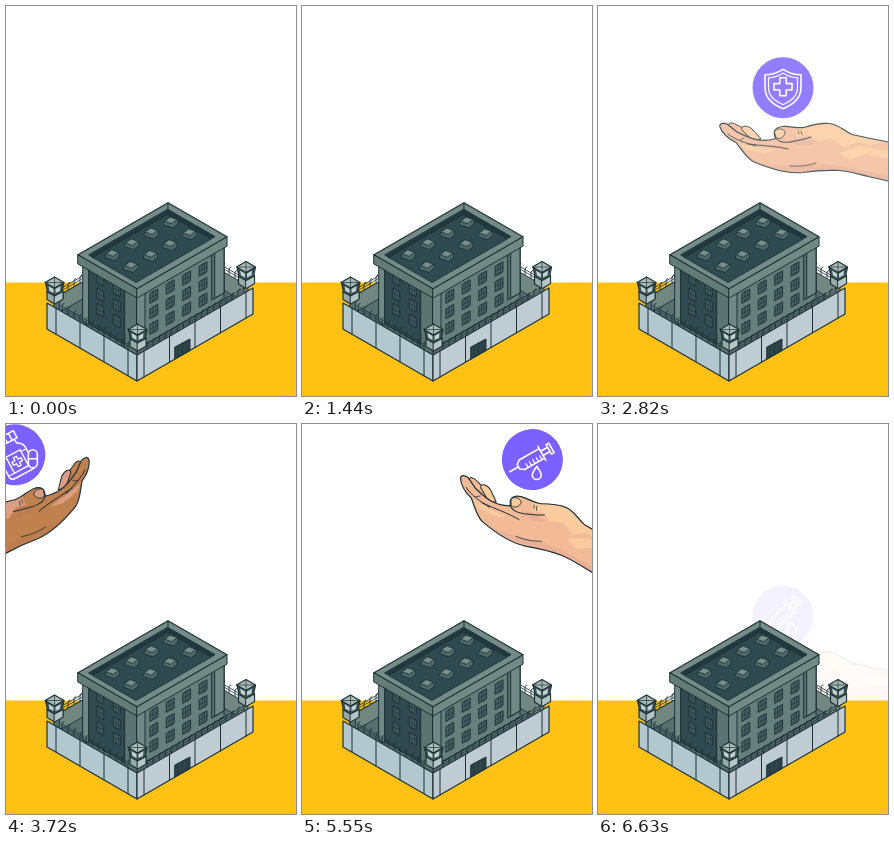
An HTML page that plays this animation: 290x390 px, repeating every 7.11 s.

```html
<!DOCTYPE html>
<html lang="en">
<head>
<meta charset="utf-8">
<title>Care over the walls</title>
<style>
html, body { margin: 0; width: 100%; height: 100%; overflow: hidden; background: #fff; }
svg { display: block; width: 290px; height: 390px; }
</style>
</head>
<body>
<svg id="stage" viewBox="0 0 290 390" stroke-linejoin="round" stroke-linecap="round"></svg>
<script>
const LOOP = 7110, TICK = 30, INK = '#1d3137';
const ISO = 0.577; // slope of every isometric edge
const stage = document.getElementById('stage');

const path = (d, fill = 'none', stroke = INK, width = 1) =>
  `<path d="${d}" fill="${fill}" stroke="${stroke}" stroke-width="${width}"/>`;
const poly = (points, fill, width = 1) => path(`M${points}Z`, fill, INK, width);
const line = (d, width = 1) => path(d, 'none', INK, width);
const range = (n, fn) => Array.from({ length: n }, (_, i) => fn(i)).join('');
const at = (x, y, angle, body) => `<g transform="translate(${x} ${y}) rotate(${angle})">${body}</g>`;

/* ---------- hands and icons ---------- */

const HAND = 'M420 180L290 148L270 143.5C260 141 250 138 241 137.5C228 137 212 138.5 205 139.5C188 141 170 135 156 129C149 126 144 117 138 109.5C131 106 124 100 122 94C121 90 125 90 129 91L139 99C147 103 153 106 160 107C167 108 173 107 178 105.5C174 99 177 94 185 93.5C192 93 198 95.5 206 94.5C214 92 222 89.5 231 90.5C240 91 246 98 254 101.5L270 105L290 109L420 140';

function hand({ base, light, shade }) {
  return path('M131 94C129 89 134 89 139 92L151 98L162 107L150 111Z', base) +
    path('M144 97C142 92 149 92 154 96L163 106L156 108Z', light) +
    path(HAND, base, 'none') +
    path('M198 95C212 94 222 90 232 91C242 92 248 100 262 104L290 109L272 112L258 109L246 115L234 106L220 108L209 102L199 104Z', light, 'none') +
    path('M242 120L262 113L290 118V126L268 121L252 127Z', light, 'none') +
    path('M139 110C150 114 164 115 178 117L166 120L148 117Z', light, 'none') +
    path('M160 130C178 135 196 132 220 131C240 131 256 136 290 143V148C266 142 250 138 238 137.5C220 137 190 142 160 130Z', shade, 'none') +
    path('M190 108C198 105 208 106 216 110C210 114 198 113 190 108Z', shade, 'none') +
    line(HAND, 1.2) +
    line('M177 104C179 109 186 110 193 109C200 107 206 107 213 104') +
    line('M130 101C137 107 148 110 158 113M150 111C165 113 178 113 190 116', .9) +
    line('M192 133C204 134 212 132 218 130M203 98L204 102M200 97.5L201 101M142 107L146 105', .7) +
    path('M176.5 99C178 95 184 95 187 98.5C187 104 182 107 178.5 105Z', light, INK, .8);
}

const white = (d, width = 1.6) => path(d, 'none', '#fff', width);
const cross = (s, a) =>
  `M${-a} ${-s}h${2 * a}v${s - a}h${s - a}v${2 * a}h${a - s}v${s - a}h${-2 * a}v${a - s}h${a - s}v${-2 * a}h${s - a}Z`;
const capsule = (l, r) =>
  `<rect x="${-l}" y="${-r}" width="${2 * l}" height="${2 * r}" rx="${r}" fill="#7b61ff" stroke="#fff" stroke-width="1.6"/>` +
  white(`M0 ${-r}V${r}`);

const icons = {
  pills: at(-5.5, 0, -13,
      '<rect x="-11" y="-19" width="22" height="38" rx="2.5" fill="none" stroke="#fff" stroke-width="1.6"/>' +
      range(8, i => `<circle cx="${i % 2 ? 5 : -5}" cy="${(i >> 1) * 8.8 - 13.2}" r="3" fill="none" stroke="#fff" stroke-width="1.4"/>`)) +
    at(12, 11, -41, capsule(11, 5.5)),
  shield:
    white('M0-18.5C6-14.5 12-13 18-13V0C18 10 10 17 0 21C-10 17-18 10-18 0V-13C-12-13-6-14.5 0-18.5Z') +
    white('M0-14.5C5-11.5 10-10 14.5-10V0C14.5 8 8 13.5 0 17C-8 13.5-14.5 8-14.5 0V-10C-10-10-5-11.5 0-14.5Z', 1.2) +
    at(0, -1, 0, white(cross(9, 3.2))),
  bottle:
    white('M-11-22H10V-14H-11ZM-6-22V-14M-1-22V-14M4.5-22V-14M-8-14V-10C-12-8-15.5-6-15.5-1V17Q-15.5 21-11 21H9Q13 21 13 17V-1C13-6 10-8 7-10V-14', 1.5) +
    white('M-15 0H-9M7 0H13M-15 16H-9', 1.1) +
    white('M-9-2H7V16H-9Z', 1.4) + at(-1, 7, 0, white(cross(5, 1.7), 1.3)) +
    at(14, 12, -62, capsule(9, 4.5)),
  syringe: at(-1, 0, -47,
      white('M-25 0H-15M-15-2.5L-11-5.5H12V5.5H-11L-15 2.5ZM12-8V8M12-2.5H20M12 2.5H20M20-5.5H23V5.5H20Z') +
      white('M-7 5V1M-3 5V1M1 5V1M5 5V1M9 5V1', 1.2)) +
    at(8, 11, -17, white('M0-6C3-2 4.5 0 4.5 2.5A4.5 4.5 0 0 1-4.5 2.5C-4.5 0-3-2 0-6Z'))
};

const skins = {
  tan: { base: '#c0814f', light: '#db9d84', shade: '#bd7d50' },
  fair: { base: '#f3ba98', light: '#fbcb9d', shade: '#eab094' }
};

const acts = [
  { side: -1, skin: 'tan', icon: 'pills', enter: 90, leave: 1050, clear: 1440 },
  { side: 1, skin: 'fair', icon: 'shield', enter: 1860, leave: 2820, clear: 3630 },
  { side: -1, skin: 'tan', icon: 'bottle', enter: 3630, leave: 4590, clear: 4980 },
  { side: 1, skin: 'fair', icon: 'syringe', enter: 5400, leave: 6360, clear: 7110 }
];

const actors = acts.map(({ side, skin, icon }) => {
  const flip = side < 0 ? 'translate(270 0) scale(-1 1)' : '';
  return `<g class="act"><g transform="${flip}">${hand(skins[skin])}</g>` +
    at(135 + side * 50, 54.8, 0, `<circle r="30.5" fill="#7b61ff"/>${icons[icon]}`) + '</g>';
}).join('');

/* ---------- prison ---------- */

const WALL_L = '#b3c7ce', WALL_R = '#bfccd4', STONE = '#667f7a', PILLAR = '#718984', DARK = '#314a51';

// Upright isometric face: top-left corner, width, height, direction of the slope
const face = (x, y, w, h, dir, fill, width = 1) =>
  poly(`${x} ${y}l${w} ${w * ISO * dir}v${h}l${-w} ${-w * ISO * dir}`, fill, width);

// Flat isometric slab from its back corner: reach to the left and to the right
const slab = (x, y, left, right, fill, width = 1) =>
  poly(`${x} ${y}l${right} ${right * ISO}l${-left} ${left * ISO}l${-right} ${-right * ISO}`, fill, width);

const windowAt = (x, y, w, dir, fill) =>
  face(x - w / 2, y - 5 - dir * w * ISO / 2, w, 10, dir, fill, 1) +
  line(`M${x - 1.1} ${y - 5}v10M${x + 1.3} ${y - 5}v10M${x - w / 2} ${y - dir * w * ISO / 2}l${w} ${dir * w * ISO}`, .6);

const vent = (x, y) =>
  poly(`${x - 7} ${y + 1}l5-5l9 3v4l-5 4l-9-3`, '#506769', .9) +
  poly(`${x - 6} ${y}l5-4l7 2.5l-5 4`, '#788e89', .8);

function wire(x1, y1, x2, dir) {
  const n = Math.round((x2 - x1) / 6), dx = (x2 - x1) / n, dy = dx * ISO * dir;
  const strand = h => `M${x1} ${y1 - h}l${dx * n} ${dy * n}`;
  return line(strand(5) + strand(2.5), .8) +
    range(n + 1, i => line(`M${x1 + i * dx} ${y1 + i * dy}v-6l2-1.5`, .9));
}

const tower = (x, y) =>
  poly(`${x - 7.5} ${y + 14}l7.5 4.5l8.5-4.5v8l-8.5 5l-7.5-4.5`, '#96aaa8', 1.2) +
  poly(`${x} ${y + 18.5}l8.5-4.5v8l-8.5 5`, '#b3c5c6', 1) +
  poly(`${x - 9} ${y + 6}l9 4.5l9.5-4.5l-2 9l-7.5 4l-7-4`, '#3a5154', 1.1) +
  path(`M${x - 6} ${y + 9}l5 3v4l-4-2ZM${x + 6} ${y + 9}l-5 3v4l4.5-2Z`, '#c3d2d1', 'none') +
  poly(`${x - 9.5} ${y + 5.5}L${x} ${y}L${x + 9.5} ${y + 5.5}L${x} ${y + 11}`, '#a9bdb6', 1.2) +
  line(`M${x} ${y}V${y + 11}M${x - 9} ${y + 5.5}H${x + 9}`, .7);

const prison =
  poly('48 292L78 275H218L240 278V296L131 352L48 304', '#596f6f') +
  face(54, 289, 26, 17, -1, '#72877f', .9) +
  face(216, 265, 26, 18, 1, '#72877f', .9) +
  wire(56, 287, 80, -1) + wire(217, 265, 235, 1) +
  face(77, 256, 6, 60, 1, PILLAR) +
  face(83, 262, 36, 56, 1, DARK) +
  face(119, 284, 12, 58, 1, '#5c7470') +
  face(131, 291, 87, 52, -1, STONE) +
  face(131, 291, 8, 52, -1, PILLAR) +
  face(206, 248, 12, 46, -1, '#58706c') +
  face(209, 246, 9, 46, -1, PILLAR) +
  range(6, i => windowAt(i % 2 ? 111 : 94.5, (i % 2 ? 284 : 273.5) + (i >> 1) * 15.5, 6.5, 1, '#475e62')) +
  range(12, i => windowAt(148 + (i % 4) * 16.4, 290 - (i % 4) * 9 + Math.floor(i / 4) * 15.5, 7.5, -1, '#4a6265')) +
  face(72, 248.5, 59, 9.5, 1, '#647b76') +
  face(131, 282.5, 90, 9.5, -1, '#718a84') +
  slab(162, 196.8, 90, 59, '#748b86', 1.2) +
  slab(162, 203.5, 79, 47, '#22383e') +
  slab(162, 208.5, 75, 43, '#304a52', .5) +
  line('M162 197V208') +
  range(8, i => vent(165 - 19.5 * (i % 4) + 18.5 * (i >> 2), 215 + 10.9 * (i % 4) + 11.8 * (i >> 2))) +
  face(41, 297, 90, 26, 1, WALL_L, 1.2) +
  face(131, 349, 116, 26, -1, WALL_R, 1.2) +
  range(4, i => line(`M${50 + 24 * i} ${302.2 + 13.85 * i}v26`)) +
  range(5, i => line(`M${138 + 25.5 * i} ${345 - 14.7 * i}v26`)) +
  poly('169 341L184 333V344.5L169 353', '#2e454c') +
  line('M172 340V351M176.5 337V349M181 335V346', .6) +
  wire(56, 305, 122, 1) + wire(141, 343, 238, -1) +
  tower(48.5, 271) + tower(240, 255.5) + tower(131.5, 318);

stage.innerHTML = actors + '<rect y="276.5" width="290" height="114" fill="#ffc113"/>' + prison;

/* ---------- motion ---------- */

const groups = [...stage.querySelectorAll('.act')];
const easeOut = t => 1 - (1 - Math.min(1, t)) ** 1.7;

function pose(act, group, t) {
  const visible = t >= act.enter && t < act.clear;
  group.style.display = visible ? '' : 'none';
  if (!visible) return;
  const swing = 60 * act.side * (1 - easeOut((t - act.enter + 45) / 375));
  const fall = t < act.leave ? 0 : easeOut((Math.min(270, t - act.leave) + 45) / 410);
  const pivotX = act.side < 0 ? -1 : 271;
  group.setAttribute('transform', `translate(0 ${150 * fall}) rotate(${swing} ${pivotX} 195)`);
  group.setAttribute('opacity', 1 - fall);
}

const start = performance.now();
function draw() {
  const t = Math.floor((performance.now() - start) % LOOP / TICK) * TICK;
  acts.forEach((act, i) => pose(act, groups[i], t));
  requestAnimationFrame(draw);
}
draw();
</script>
</body>
</html>
```
